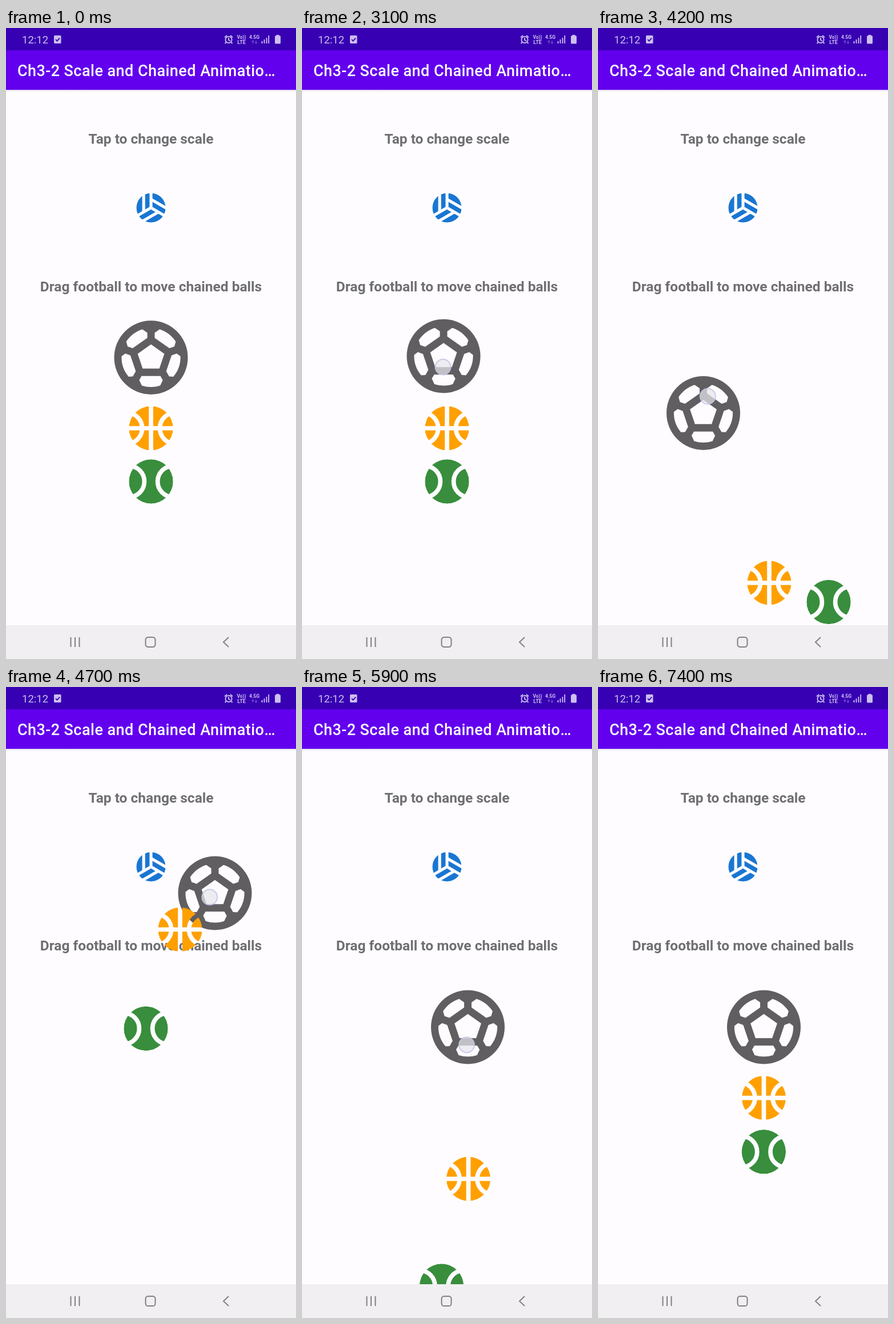
Write an HTML page that moves like this. It is 508 px wide and 1102 px high and loops after 7500 ms.

```html
<!DOCTYPE html>
<html lang="en">
<head>
<meta charset="utf-8">
<title>Scale and chained animation</title>
<style>
  html, body { margin: 0; width: 100%; height: 100%; overflow: hidden; background: #fefcff; }
  svg { display: block; width: 100%; height: 100%; }
  text { font-family: Roboto, sans-serif; }
  .heading { font-size: 24.5px; font-weight: 700; fill: #6f6e72; text-anchor: middle; }
  .status { fill: #cdbff0; }
  .status .line { fill: none; stroke: #cdbff0; stroke-width: 1.8; }
  .nav { fill: none; stroke: #818083; stroke-width: 2; }
  .seams { fill: none; stroke: #000; stroke-width: 2; }
</style>
</head>
<body>
<svg viewBox="0 0 508 1102" preserveAspectRatio="none">
  <defs>
    <linearGradient id="shadow" x2="0" y2="1">
      <stop stop-color="#dfdbe5"/><stop offset="1" stop-color="#fefcff"/>
    </linearGradient>
    <circle id="disc" r="10"/>
    <path id="panel" d="M0 .577V-11M-5 2.5V-11"/>
    <mask id="volleySeams" maskUnits="userSpaceOnUse" x="-12" y="-12" width="24" height="24">
      <use href="#disc" fill="#fff"/>
      <g class="seams">
        <use href="#panel"/>
        <use href="#panel" transform="rotate(120)"/>
        <use href="#panel" transform="rotate(240)"/>
      </g>
    </mask>
    <mask id="basketSeams" maskUnits="userSpaceOnUse" x="-12" y="-12" width="24" height="24">
      <use href="#disc" fill="#fff"/>
      <g class="seams">
        <path d="M0-11V11M-11 0H11"/>
        <circle cx="-11" r="7"/><circle cx="11" r="7"/>
      </g>
    </mask>
    <mask id="tennisSeams" maskUnits="userSpaceOnUse" x="-12" y="-12" width="24" height="24">
      <use href="#disc" fill="#fff"/>
      <g class="seams"><circle cx="-10" r="7"/><circle cx="10" r="7"/></g>
    </mask>
  </defs>

  <rect width="508" height="1102" fill="#fefcff"/>
  <rect y="107" width="508" height="5" fill="url(#shadow)"/>
  <rect y="39" width="508" height="69" fill="#6200ee"/>
  <rect width="508" height="39" fill="#3700b3"/>

  <g class="status">
    <text x="28" y="27" font-size="18.5">12:12</text>
    <rect x="84" y="13" width="12.5" height="14" rx="1.5"/>
    <path d="M87 20l2.5 2.7 4.5-5" fill="none" stroke="#3700b3" stroke-width="1.8"/>
    <circle class="line" cx="390" cy="20.5" r="5.6"/>
    <path class="line" d="M390 17v4l3 1.5M383 16.5l4-3.5M397 16.5l-4-3.5M385.5 25l-2 2M394.500 25l2 2"/>
    <g font-weight="700" text-anchor="middle">
      <text x="412.5" y="18.500" font-size="8.5">Vo))</text>
      <text x="412.500" y="27.500" font-size="9">LTE</text>
      <text x="435" y="19" font-size="8.5">4.5G</text>
    </g>
    <path class="line" style="stroke-width:1;opacity:.55" d="M432.500 27v-5m-2 2l2-2 2 2M438 22v5m-2-2l2 2 2-2"/>
    <path class="line" d="M448.500 27v-4M452.500 27v-7M456.500 27V17M460.200 27V13"/>
    <path d="M473.500 13.500v-1.500h5v1.500h1a1.500 1.500 0 0 1 1.500 1.500v11a1.500 1.500 0 0 1-1.500 1.500h-7a1.500 1.500 0 0 1-1.500-1.500v-11a1.500 1.500 0 0 1 1.500-1.500z"/>
  </g>

  <text x="20" y="84" font-size="27" font-weight="500" letter-spacing=".45" fill="#fff">Ch3-2 Scale and Chained Animatio…</text>
  <text class="heading" x="254" y="202">Tap to change scale</text>
  <text class="heading" x="254" y="460">Drag football to move chained balls</text>

  <g id="volley"><use href="#disc" fill="#1976d2" mask="url(#volleySeams)"/></g>
  <g id="football">
    <path transform="translate(-12 -12)" fill="#605e61" fill-rule="evenodd" d="M12 2a10 10 0 1 0 0 20 10 10 0 1 0 0-20z
      M13 5.300l1.350-.950c1.820.560 3.370 1.760 4.380 3.340l-.390 1.340-1.350.460L13 6.700z
      M9.650 4.350L11 5.300v1.400L7.010 9.490l-1.350-.460-.390-1.340c1.010-1.570 2.560-2.770 4.380-3.340z
      M7.080 17.110l-1.140.100C4.730 15.810 4 13.990 4 12c0-.120.010-.230.020-.350l1-.730 1.380.480 1.460 4.340z
      M14.500 19.590a8 8 0 0 1-5 0l-.690-1.490.640-1.100h5.110l.640 1.110z
      M14.270 15H9.730l-1.350-4.020L12 8.440l3.630 2.540z
      M18.060 17.210l-1.140-.100-.790-1.370 1.460-4.340 1.390-.470 1 .730c.010.110.020.220.020.340 0 1.990-.730 3.810-1.940 5.210z"/>
  </g>
  <g id="basket"><use href="#disc" fill="#ffa000" mask="url(#basketSeams)"/></g>
  <g id="tennis"><use href="#disc" fill="#388e3c" mask="url(#tennisSeams)"/></g>
  <g id="finger">
    <circle r="13.500" fill="#e6e6ea" fill-opacity=".72" stroke="#c3c4e6" stroke-opacity=".85" stroke-width="2"/>
  </g>

  <rect y="1043" width="508" height="59" fill="#f1eff2"/>
  <g class="nav">
    <path d="M113.500 1064v17M121 1064v17M128.500 1064v17"/>
    <rect x="244.500" y="1064" width="17" height="17" rx="4.500"/>
    <path d="M390 1064l-9 8.500 9 8.500"/>
  </g>
</svg>
<script>
const LOOP = 7500, STEP = 100, DRAG_START = 30, RELEASE = 59;

// Football centre, one point per step of the drag.
const path = [
  [254, 575.5], [248, 573], [250.5, 543], [285, 490], [365, 470], [440, 490],
  [440, 570], [430, 650], [428, 720], [404, 786], [300, 845.5], [212, 800],
  [184.5, 672.5], [209, 522], [245, 380], [305, 300], [355, 310], [366, 360],
  [348, 300], [295, 253.5], [191.5, 397.5], [142, 510], [154, 618], [174, 693],
  [187, 800], [212, 858], [244.5, 829.5], [291.5, 735.5], [296, 630], [290.5, 594]
];

const node = id => document.getElementById(id);
const place = (id, [x, y], scale) =>
  node(id).setAttribute('transform', `translate(${x} ${y}) scale(${scale})`);

const leader = step =>
  path[Math.max(0, Math.min(path.length - 1, step - DRAG_START))];

// Underdamped spring from 0 to 1.
const spring = s => s <= 0 ? 0
  : 1 - Math.exp(-7 * s) * (Math.cos(12.2 * s) + 0.577 * Math.sin(12.2 * s));

// Each chained ball trails the leader, then swings to rest after release.
function follower(step, delay, drop, swingX, swingY, speed) {
  const [x, y] = leader(step - delay);
  const s = Math.max(0, step - RELEASE) / 10;
  const swing = Math.exp(-3.5 * s) * Math.sin(speed * s);
  return [x + swingX * swing, y + drop + swingY * swing];
}

function fingerAt(step) {
  if (step === 2 || step === 14) return [254, 318];
  if (step <= DRAG_START || step > RELEASE + 1) return null;
  const [x, y] = leader(step), [nx, ny] = leader(step + 1);
  return [x - 2 + 0.4 * (nx - x), y + 31 + 0.4 * (ny - y)];
}

function draw(step) {
  const growth = spring((step - 2) / 10) - spring((step - 14) / 10);
  place('volley', [254, 314], 2.57 * (1 + 2 * growth));
  place('football', leader(step), 6.45);
  place('basket', follower(step, 2, 123.5, 0, 90, 8.5), 3.87);
  place('tennis', follower(step, 3, 216.5, -35, 285, 5.7), 3.87);
  const touch = fingerAt(step);
  node('finger').style.display = touch ? '' : 'none';
  if (touch) place('finger', touch, 1);
}

function tick() {
  draw(Math.floor(performance.now() % LOOP / STEP));
  requestAnimationFrame(tick);
}
tick();
</script>
</body>
</html>
```
